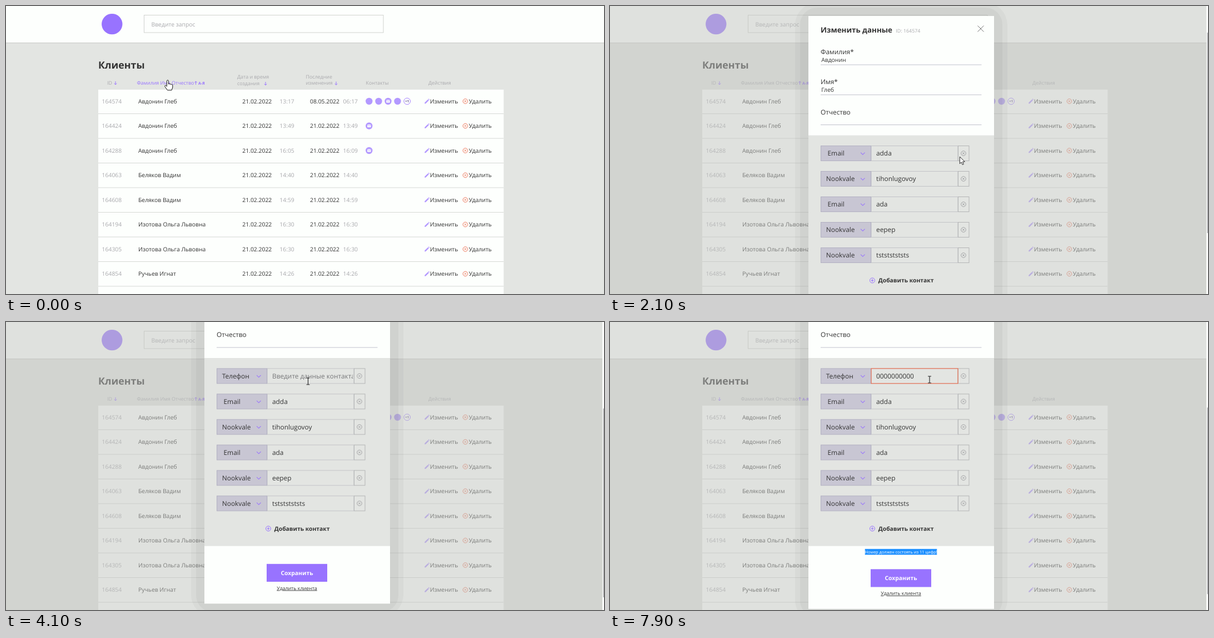
An HTML page for the animation above (8000 ms loop, 1076 px wide and 520 px high).

```html
<!DOCTYPE html>
<html lang="ru">
<head>
<meta charset="utf-8">
<title>Клиенты</title>
<style>
  html, body { margin: 0; width: 100%; height: 100%; overflow: hidden; background: #e3e5e2; }
  svg { display: block; }
  text { font-family: 'Open Sans', sans-serif; text-rendering: geometricPrecision; white-space: pre; }
</style>
</head>
<body>
<svg id="stage" width="1076" height="520" viewBox="0 0 1076 520"></svg>
<script>
const LOOP = 8000, TICK = 100;
const WHITE = '#fdfffd', PAGE = '#e3e5e2', INK = '#333', MUTED = '#a9a9ad', PURPLE = '#9873ff', SOFT = '#b399ff', RED = '#f0603c';
const SIZE = { xs: 7.42, s: 8.9, m: 10.39, l: 11.87, xl: 13.36, xxl: 17.81 };

const text = (x, y, str, size = SIZE.m, fill = INK, extra = '') =>
  `<text x="${x}" y="${y}" font-size="${size}" fill="${fill}" ${extra}>${str}</text>`;
const rect = (x, y, w, h, fill, extra = '') =>
  `<rect x="${x}" y="${y}" width="${w}" height="${h}" fill="${fill}" ${extra}/>`;
const circle = (x, y, r, fill, extra = '') =>
  `<circle cx="${x}" cy="${y}" r="${r}" fill="${fill}" ${extra}/>`;
const stroke = (x, y, d, color, width = 1) =>
  `<path transform="translate(${x} ${y})" d="${d}" fill="none" stroke="${color}" stroke-width="${width}"/>`;
const group = (id, body, extra = '') => `<g id="${id}" ${extra}>${body}</g>`;
const BOLD = 'font-weight="700"';

const DOWN = 'M0-3V3M-2.3.7L0 3 2.3.7', UP = 'M0 3V-3M-2.3-.7L0-3 2.3-.7';
const crossCircle = (x, y, color) =>
  circle(x, y, 4.3, 'none', `stroke="${color}"`) + stroke(x, y, 'M-1.8-1.8L1.8 1.8M1.8-1.8L-1.8 1.8', color);

// Page
const DATE = '21.02.2022';
const clients = [
  [164574, 'Авдонин Глеб', '13:17', '08.05.2022', '06:17'],
  [164424, 'Авдонин Глеб', '13:49', DATE, '13:49'],
  [164288, 'Авдонин Глеб', '16:05', DATE, '16:09'],
  [164063, 'Беляков Вадим', '14:40', DATE, '14:40'],
  [164608, 'Беляков Вадим', '14:59', DATE, '14:59'],
  [164194, 'Изотова Ольга Львовна', '16:30', DATE, '16:30'],
  [164305, 'Изотова Ольга Львовна', '16:30', DATE, '16:30'],
  [164854, 'Ручьев Игнат', '14:26', DATE, '14:26'],
];

const dot = (x, y) => circle(x, y, 6.2, SOFT);
const mail = (x, y) => dot(x, y) + rect(x - 3.2, y - 2.4, 6.4, 4.8, WHITE, 'rx=".6"') +
  stroke(x, y, 'M-2.8-1.7L0 .3 2.8-1.7', SOFT, .8);
const more = (x, y) => circle(x, y, 5.8, WHITE, `stroke="${PURPLE}" stroke-width=".9"`) +
  text(x, y + 2.1, '+1', 6, '#5a4a8a', BOLD + ' text-anchor="middle"');
const icons = [
  y => dot(653.3, y) + dot(670.5, y) + mail(687.5, y) + dot(704.5, y) + more(721.7, y),
  y => mail(653.3, y),
  y => mail(653.3, y),
];

function clientRow([id, name, time, date, edited], i) {
  const y = 172 + 44.5 * i, base = y + 3.8;
  const pencil = `<path ${i ? '' : 'id="pencil"'} transform="translate(757.3 ${y + .3})" fill="${SOFT}"
    d="M-4 4V2.2L1.8-3.6 3.6-1.8-2.2 4zM2.4-4.2l.8-.8 1.8 1.8-.8.8z"/>`;
  return text(172.6, base, id, SIZE.m, MUTED) + text(238, base, name) +
    text(425.3, base, DATE) + text(492.3, base, time, SIZE.m, MUTED) +
    text(547, base, date) + text(606.5, base, edited, SIZE.m, MUTED) +
    (icons[i] ? icons[i](y) : '') + pencil +
    text(762.8, base, 'Изменить', SIZE.m, INK, i ? '' : 'id="edit"') +
    crossCircle(826.5, y, '#ee7a5f') + text(832.8, base, 'Удалить') +
    rect(166, y + 22, 729.5, 1, '#d6d8d5');
}

const head = (x, y, str, extra) => text(x, y, str, SIZE.s, MUTED, extra);
const page = rect(0, 0, 1076, 520, PAGE) + rect(0, 0, 1076, 66, WHITE) + rect(0, 66, 1076, 1.2, '#cccecb') +
  circle(190.8, 32.6, 18.7, PURPLE) +
  rect(248.5, 16.5, 430.5, 31.5, WHITE, 'stroke="#d0d2cf"') + text(261.5, 37, 'Введите запрос', SIZE.m, MUTED) +
  text(166, 113.2, 'Клиенты', SIZE.xxl, INK, BOLD) +
  head(182, 142, 'ID') + stroke(197, 139, DOWN, PURPLE) +
  head(235.5, 142, 'Фамилия Имя Отчество', 'id="sort"') + stroke(341.5, 139, UP, PURPLE) +
  text(346, 141.6, 'А-Я', 7, PURPLE, BOLD) +
  head(416, 131, 'Дата и время') + head(416, 142.8, 'создания') + stroke(467, 140, DOWN, PURPLE) +
  head(539.5, 130.5, 'Последние') + head(539.5, 142, 'изменения') + stroke(594, 139.5, DOWN, PURPLE) +
  head(647.5, 142, 'Контакты') + head(760, 142, 'Действия') +
  rect(166, 151, 729.5, 369, WHITE) + clients.map(clientRow).join('') +
  circle(758, 172, 3.8, 'none', `id="spinner" stroke="${PURPLE}" stroke-width="1.7" stroke-dasharray="18 6"`);

// Modal
const FIRST_ROW = 325, ROW_STEP = 46, FOOT = 586, ERROR_GAP = 9.5;
const field = (i, label, value) => {
  const y = 54.2 * i;
  return text(379, 146.2 + y, label, SIZE.l) + text(380.2, 160 + y, value) + rect(379, 164.6 + y, 289.5, 1, '#c1c2cd');
};
const contact = (i, kind, value, x = 388.8) => {
  const y = FIRST_ROW + ROW_STEP * i;
  return rect(470, y - 13.5, 156, 27, PAGE, 'stroke="#c3c4c8"') +
    rect(379.5, y - 13.5, 90, 27, '#c8c6d3', 'stroke="#b2b0c2"') +
    rect(626.5, y - 13.5, 19.5, 27, PAGE, 'stroke="#b4b5b6"') +
    crossCircle(636, y, '#a3a4a6') + stroke(454.8, y + .5, 'M-3.7-1.8L0 1.8 3.7-1.8', PURPLE, 1.1) +
    text(x, y + 4.4, kind, SIZE.l) + text(479, y + 4.4, value, SIZE.l);
};
const email = (i, value) => contact(i, 'Email', value, 391.5);
const social = (i, value) => contact(i, 'Nookvale', value);

const warning = 'Номер должен состоять из 11 цифр!';
const warningText = fill => text(458.5, 13, warning, SIZE.xs, fill);
const modal =
  `<rect id="shadeOuter" x="333" y="53" width="382" rx="40" fill="#000" opacity=".03"/>
   <rect id="shadeInner" x="342" y="62" width="364" rx="30" fill="#000" opacity=".035"/>
   <rect id="sheet" x="357" y="77" width="334" fill="${WHITE}"/>` +
  text(379, 107.3, 'Изменить данные', SIZE.xl, INK, BOLD) + text(514.3, 107.3, 'ID: 164574', SIZE.s, MUTED) +
  stroke(667, 100, 'M-5.5-5.5L5.5 5.5M5.5-5.5L-5.5 5.5', '#777') +
  field(0, 'Фамилия*', 'Авдонин') + field(1, 'Имя*', 'Глеб') + field(2, 'Отчество', '') +
  `<rect id="section" x="357" y="292.5" width="334" fill="${PAGE}"/>` +
  group('phone', contact(0, 'Телефон', '') +
    `<svg x="470" y="311" width="154.5" height="28">${text(9, 18.4, 'Введите данные контакта', SIZE.l, '#77787a', 'id="hint"')}</svg>` +
    text(479, FIRST_ROW + 4.4, '', SIZE.l, INK, 'id="digits"') +
    rect(479, FIRST_ROW - 7.5, 1, 15, INK, 'id="caret"') +
    rect(470, FIRST_ROW - 13.5, 156, 27, 'none', `id="invalid" stroke="${RED}"`)) +
  group('rows', email(0, 'adda') + social(1, 'tihonlugovoy') + email(2, 'ada') +
    social(3, 'eepep') + social(4, 'tstststststs')) +
  group('foot',
    circle(472, -31.5, 4.5, 'none', `id="plus" stroke="${PURPLE}"`) +
    stroke(472, -31.5, 'M-2.4 0H2.4M0-2.4V2.4', PURPLE, 1.1).replace('<path', '<path id="plusMark"') +
    text(482.8, -27.8, 'Добавить контакт', SIZE.m, INK, BOLD + ' id="add"') +
    group('error', warningText(RED) +
      `<clipPath id="picked"><rect id="pickedBox" y="5" height="11"/></clipPath>` +
      `<g clip-path="url(#picked)">${rect(458.5, 5, 130, 11, '#1e90ff')}${warningText('#fff')}</g>`) +
    group('buttons', rect(469, 32.3, 109, 32.2, PURPLE) +
      text(523.5, 52.2, 'Сохранить', SIZE.m, '#fff', BOLD + ' text-anchor="middle"') +
      text(523.5, 79, 'Удалить клиента', SIZE.s, INK, 'text-anchor="middle" text-decoration="underline"')));

const cursors =
  `<path id="hand" fill="#fff" stroke="#111" stroke-linejoin="round" d="M-1.6 9.5V1.4a1.5 1.5 0 0 1 3 0V7.2a1.4 1.4 0 0 1 2.7.3a1.4 1.4 0 0 1 2.5.5a1.3 1.3 0 0 1 2.2 1V13L7 18H-.5L-5 11.6a1.4 1.4 0 0 1 1.9-2l1.5 1.6z"/>
   <path id="arrow" fill="#fff" stroke="#111" stroke-width=".9" d="M0 0V12.6L2.9 9.9 4.8 14.4 7 13.5 5.1 9.1H9z"/>
   <path id="beam" fill="none" stroke="#222" stroke-width="1.1" d="M-3-6H3M0-6V6M-3 6H3"/>`;

const stage = document.getElementById('stage');
stage.innerHTML = page +
  group('dialog', rect(0, 0, 1073, 520, '#c3c4c0', 'opacity=".51"') + group('modal', modal) +
    rect(1073, 0, 3, 520, WHITE) + rect(1074.4, 0, 1.6, 0, '#b0b0b4', 'id="thumb"')) +
  group('cursor', cursors);

const el = {};
for (const node of stage.querySelectorAll('[id]')) el[node.id] = node;
const set = (id, attrs) => { for (const k in attrs) el[id].setAttribute(k, attrs[k]); };
const show = (id, on) => set(id, { visibility: on ? 'inherit' : 'hidden' });
const move = (id, x, y) => set(id, { transform: `translate(${x} ${y})` });

// Motion: time, x, y, cursor shape from that time on
const path = [
  [0, 291, 134, 'hand'], [200, 291, 134, 'hand'], [300, 330, 140, 'arrow'], [900, 787, 172, 'hand'],
  [1400, 788, 175.5, 'hand'], [1500, 788, 175.5, 'arrow'], [1800, 788, 175.5, 'arrow'],
  [2200, 600, 290, 'arrow'], [2600, 577, 307, 'arrow'], [2800, 542, 322, 'hand'], [3100, 542, 322, 'arrow'],
  [3400, 542, 318, 'arrow'], [3700, 545, 226, 'beam'], [4100, 543.5, 107, 'beam'], [4400, 543.5, 112, 'beam'],
  [5400, 543.5, 112, 'arrow'], [5900, 535, 455, 'hand'], [6100, 537, 461, 'hand'], [6400, 545, 460, 'arrow'],
  [6700, 604, 418.5, 'arrow'], [6800, 590, 415, 'beam'], [7200, 540, 380, 'beam'],
  [7350, 510, 428, 'arrow'], [7600, 560, 280, 'arrow'], [7800, 573, 125, 'beam'], [7900, 575, 104, 'beam'],
  [LOOP, 575, 104, 'beam'],
];
const progress = (t, from, to) => Math.min(1, Math.max(0, (t - from) / (to - from)));
const ease = p => p * p * (3 - 2 * p);

function cursorAt(t) {
  const i = path.findIndex(p => p[0] > t);
  const [t0, x0, y0, shape] = path[i - 1], [t1, x1, y1] = path[i];
  const p = ease(progress(t, t0, t1));
  return [x0 + (x1 - x0) * p, y0 + (y1 - y0) * p, shape];
}

function render(t) {
  const open = t >= 1500, added = t >= 3000, failed = t >= 6000;
  const loading = t >= 1200 && !open, addHover = t >= 2600 && !added;
  const extra = added ? ROW_STEP : 0, gap = failed ? ERROR_GAP : 0;

  set('sort', { fill: t < 300 ? PURPLE : MUTED });
  set('edit', { fill: t >= 900 && t < 1900 ? PURPLE : INK });
  show('pencil', !loading);
  show('spinner', loading);
  set('spinner', { transform: `rotate(${(t - 1400) * .36 - 90} 758 172)` });

  show('dialog', open);
  const scroll = 227.5 * ease(progress(t, 1900, 2500));
  const foot = FOOT + extra, bottom = foot + 104 + gap;
  move('modal', 0, -scroll);
  set('sheet', { height: bottom - 77 });
  set('shadeInner', { height: bottom + 15 - 62 });
  set('shadeOuter', { height: bottom + 24 - 53 });
  set('section', { height: foot - 292.5 });
  move('rows', 0, extra);
  move('foot', 0, foot);
  move('buttons', 0, gap);

  show('phone', added);
  const typed = Math.round(10 * progress(t, 4400, 5400));
  el.digits.textContent = '0'.repeat(typed);
  show('hint', !typed);
  set('caret', { x: 479 + typed * 6.79 });
  el.caret.style.display = t >= 4200 && !failed && t % 1000 < 500 ? '' : 'none';
  el.invalid.style.display = failed ? '' : 'none';

  set('add', { fill: addHover ? PURPLE : INK });
  set('plus', { fill: addHover ? PURPLE : 'none' });
  set('plusMark', { stroke: addHover ? '#fff' : PURPLE });

  show('error', failed);
  const picked = 130 * progress(t, 6800, 7100);
  set('pickedBox', { x: 588.5 - picked, width: picked });

  const total = 747 + extra + gap;
  set('thumb', { y: 7 + scroll * 520 / total, height: 520 * 520 / total });

  const [x, y, shape] = cursorAt(t);
  move('cursor', x, y);
  for (const id of ['hand', 'arrow', 'beam']) show(id, id === shape);
}

function frame() {
  render(Math.floor(performance.now() % LOOP / TICK) * TICK);
  requestAnimationFrame(frame);
}
frame();
</script>
</body>
</html>
```
